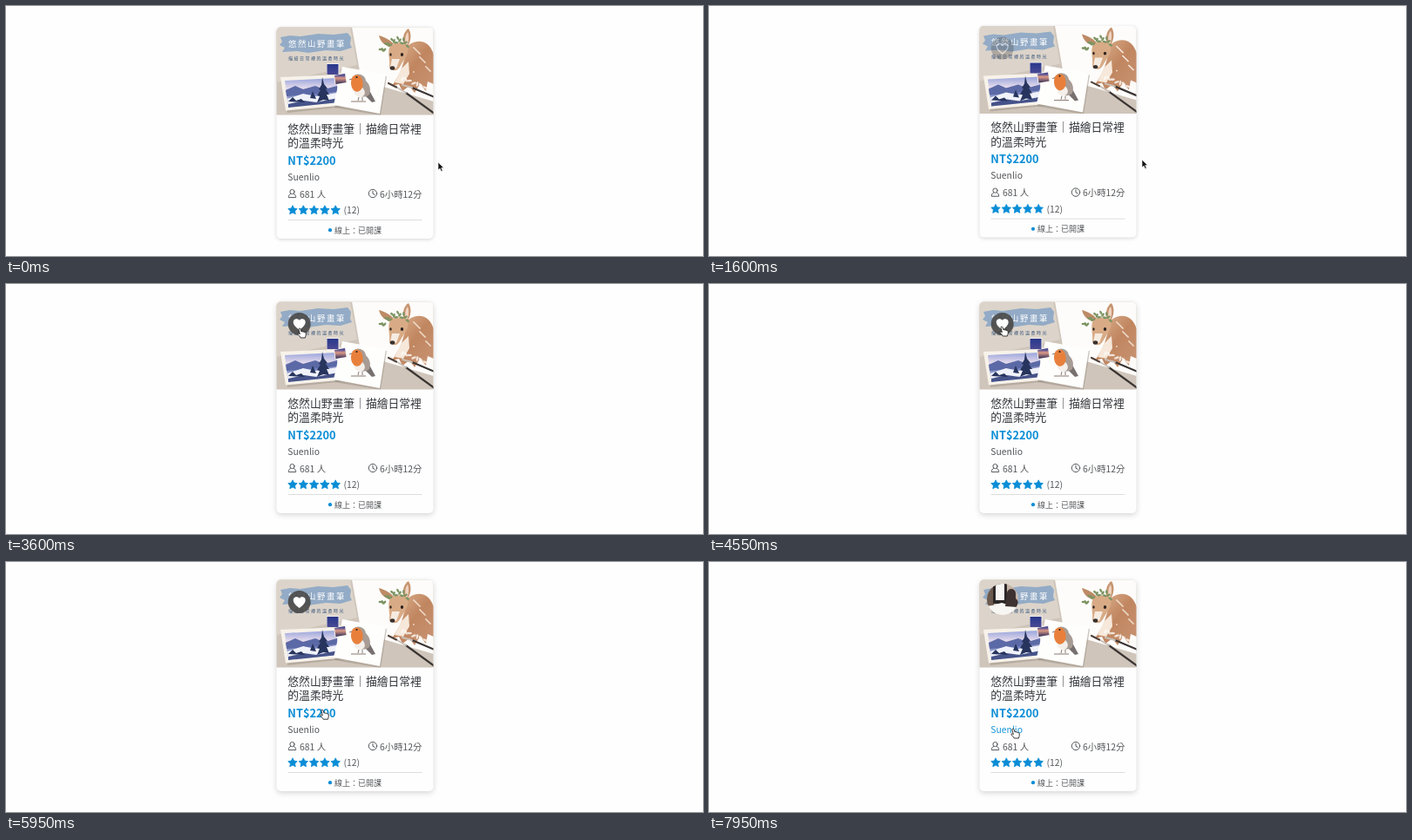
Recreate the animation shown at these times as an HTML page. Size 800 px wide and 288 px high, loop 8000 ms.

```html
<!DOCTYPE html>
<html lang="zh-TW">
<head>
<meta charset="utf-8">
<title>Course card</title>
<style>
  html, body { margin: 0; width: 100%; height: 100%; overflow: hidden; background: #fefefe; }
  svg { display: block; width: 800px; height: 288px; }
  text { font-family: "Noto Sans CJK TC", "Noto Sans CJK", "Noto Sans CJK JP", "Noto Sans", sans-serif; font-size: 10.4px; fill: #55575a; }
  .title { font-size: 12.8px; fill: #33363b; }
  .price { font-size: 12.8px; font-weight: 700; fill: #0a8dd6; }
  .icon { fill: none; stroke: #55575a; stroke-linecap: round; stroke-linejoin: round; }
</style>
</head>
<body>
<svg viewBox="0 0 800 288">
  <defs>
    <clipPath id="banner"><path d="M310.500 125.500V29.500a5 5 0 0 1 5-5h170a5 5 0 0 1 5 5v96z"/></clipPath>
    <clipPath id="round"><circle cx="337" cy="47" r="18"/></clipPath>
    <linearGradient id="sky" x2="0" y2="1">
      <stop stop-color="#98a5dc"/><stop offset=".35" stop-color="#e6dbec"/>
      <stop offset=".55" stop-color="#7180bd"/><stop offset="1" stop-color="#e9ecf7"/>
    </linearGradient>
    <linearGradient id="dusk" x2="0" y2="1">
      <stop stop-color="#28388c"/><stop offset=".55" stop-color="#4c4a94"/>
      <stop offset=".7" stop-color="#dd9a86"/><stop offset="1" stop-color="#2a2a58"/>
    </linearGradient>
    <linearGradient id="fur" x2="1" y2="1">
      <stop stop-color="#e0b794"/><stop offset=".5" stop-color="#c08660"/><stop offset="1" stop-color="#c99474"/>
    </linearGradient>
  </defs>

  <g id="card">
    <rect id="panel" x="310.500" y="24.500" width="180" height="243.500" rx="5" fill="#fefefe"/>
    <g clip-path="url(#banner)">
      <path fill="#cfc5ba" d="M310 24h181v102H310z"/>
      <path fill="#dcd4ca" d="M310 24h85l8 44-93 20z"/>
      <path fill="#fdfcfa" d="M397 24h94v86l-58-17-27-18z"/>

      <g id="deer">
        <path fill="url(#fur)" d="M462 45C475 36 487 42 491 56V90L484 87 482 98 475 90 469 100 463 92 455 98 451 90 443 92C449 83 453 76 455 69z"/>
        <path fill="#f6e8da" d="M454 72L462 64 463 78 456 90 446 88z"/>
        <g id="washes" fill="#fdfaf6" opacity=".8"></g>
        <g id="spots" fill="#f7eadb"></g>
        <path fill="#c69470" d="M457 46C454 37 457 29 462 26 466 32 465 41 460 48z"/>
        <path fill="#f0d3c0" d="M459 45C457 38 459 32 461 30 463 35 462 42 460 46z"/>
        <path fill="#bd8b66" d="M442 47C435 46 430 42 428 34 435 36 441 39 445 44z"/>
        <path fill="#d8ab86" d="M440 48C444 41 456 40 461 47 463 55 457 61 452 70 449 76 442 75 440 70 441 62 438 56 440 48z"/>
        <path fill="#f6ebe1" d="M443 61L452 61 448 72 441 71z"/>
        <ellipse cx="443.500" cy="71.500" rx="2.800" ry="2.200" fill="#3a302d"/>
        <ellipse cx="441.500" cy="56" rx="1.200" ry="1.800" fill="#2d2421"/>
        <ellipse cx="454.500" cy="56" rx="1.700" ry="1.900" fill="#2d2421"/>
        <g id="leaves" fill="#7d9463"></g>
      </g>

      <path fill="#93abc6" d="M315 36l11-2 12 1 20-3 18 1 16-2 4 5-1 8 2 4-13 4-17-1-20 3-13-2-17 1 3-5-6-3 3-4z"/>
      <text x="324" y="46.700" style="font-size:9.400px;letter-spacing:1.600px;font-weight:500;fill:#fff">悠然山野畫筆</text>
      <text x="324" y="61.800" style="font-size:5px;letter-spacing:1.500px;font-weight:500;fill:#38557c">描繪日常裡的溫柔時光</text>

      <path fill="#9d9185" opacity=".5" d="M317 84l68-4 4 36-66 7z"/>
      <path fill="#f7f2ea" d="M315 82l68-3 3 35.500-65 6z"/>
      <path fill="url(#sky)" d="M320 86l59-3 3 28-58 6z"/>
      <path fill="#5b69a6" d="M321 97l11-5 9 4 14-4 10 4 15-4 1 7-59 5z"/>
      <path fill="#f0f2fa" d="M323 107l18-6 14 3 25-4 1 8-57 6z"/>
      <path fill="#46538a" d="M324 113l18-4 14 2 25-5 1 5-58 6z"/>
      <path fill="#27345d" d="M363 82l2 8 4 5-2 1 4 6-3 0 3 7-7-1-7 3 3-7-3-1 4-6-2-1 3-5zM324 110l5-5 4 4 6-2 4 4zM349 106l3-8 4 9z"/>

      <path fill="#978b80" opacity=".5" d="M388 74l49 7-7 45-53-9z"/>
      <path fill="#fefefd" d="M386 70l50 9-7 45-53-10z"/>
      <path fill="#f3efe8" d="M368 66h14.500v13.500H368zM376 78.500l13.500-2 2 12-14 2z"/>
      <path fill="url(#dusk)" d="M368.500 67h13v12h-13zM377 80l12-2 1.500 10-12 2z"/>

      <g id="bird">
        <path fill="#76706f" d="M410 90l8 9 6 11-4 1-9-9z"/>
        <path fill="#a89c94" d="M399 81c4-5 13-2 14 5 5 5 6 10 4 16-6 5-14 2-16-4z"/>
        <path fill="#e8803c" d="M397 83c3-5 9-4 11 0 3 6 2 13-3 16-7 1-11-8-8-16z"/>
        <path fill="#f4efea" d="M399 98c5 2 8 0 10-4 5 5 3 10-2 11-4 0-7-3-8-7z"/>
        <circle cx="402.500" cy="82" r="1.100" fill="#222"/>
        <path fill="none" stroke="#6b564b" stroke-width=".800" d="M397 84l-3 1M405 105l-1 4M409 105l0 4M396 110l17 0"/>
      </g>

      <g fill="none" stroke-linecap="round">
        <path stroke="#3a3533" stroke-width="2.200" d="M459 100L492 124M466 94L492 105"/>
        <path stroke="#c9c0b8" stroke-width="2" d="M449 94L459 100M455 91L466 94"/>
        <path stroke="#514139" stroke-width="2.200" d="M439 89L448 93.500"/>
      </g>
    </g>

    <g id="like">
      <circle cx="336.700" cy="50" r="13" fill="#4a4a4a" fill-opacity=".92"/>
      <path id="heart" stroke="#fff" stroke-width="1.200" stroke-linejoin="round" d="M336.700 56.300C332.700 53.300 330.300 51 330.300 48.300C330.300 44.400 335 43.700 336.700 46.800C338.400 43.700 343.100 44.400 343.100 48.300C343.100 51 340.700 53.300 336.700 56.300z"/>
    </g>
    <g id="avatar" clip-path="url(#round)">
      <path fill="#c3b3a4" d="M318 28h38v38h-38z"/>
      <path fill="#6d5a4e" d="M318 28h9v26h-9z"/>
      <path fill="#2b2727" d="M326 28h16v24h-16z"/>
      <path fill="#f8f6f3" d="M329 28h10v20h-10zM318 56l18-5 20 6v9h-38z"/>
      <path fill="#3d3230" d="M342 40a5 5 0 0 1 10 0v6q4 3 4 10l-16-1z"/>
    </g>

    <text class="title" x="323.300" y="145.500">悠然山野畫筆｜描繪日常裡</text>
    <text class="title" x="323.300" y="162.200">的溫柔時光</text>
    <text class="price" x="323.300" y="182.700">NT$2200</text>
    <text id="author" x="323.300" y="200.800">Suenlio</text>
    <g class="icon">
      <circle cx="328.500" cy="214" r="2.600"/>
      <path d="M326.500 216.500C324.800 217.300 324.300 218.800 324.300 220.600H332.700C332.700 218.800 332.200 217.300 330.500 216.500"/>
      <circle cx="421" cy="216" r="4.700"/>
      <path d="M421 213.200v3l2.200 1.200"/>
    </g>
    <text x="337" y="220.500">681 人</text>
    <text x="477.500" y="220.500" text-anchor="end">6小時12分</text>
    <g id="stars" fill="#0a8dd6" stroke="#0a8dd6" stroke-width=".800" stroke-linejoin="round"></g>
    <text x="387.500" y="239">(12)</text>
    <path stroke="#dedede" d="M323.500 246.500h154"/>
    <circle cx="372" cy="258.200" r="2.100" fill="#0a8dd6"/>
    <text x="377" y="261.600" style="font-size:9px">線上：已開課</text>
  </g>

  <g id="cursor" stroke-linejoin="round">
    <path id="arrow" fill="#111" stroke="#fff" stroke-width=".600" d="M0 0V9L2.100 7.200 3.600 10.500 5.200 9.800 3.700 6.600H6.400z"/>
    <path id="hand" fill="#fff" stroke="#222" stroke-width=".900" d="M-2 1.200C-2.200-.1-.4-.5 0 .8L1 4C1.500 3.300 2.700 3.500 2.900 4.300 3.600 3.700 4.600 4 4.700 4.800 5.400 4.400 6.100 4.900 6.200 5.700L6.300 7.700C6.300 9.200 5.400 9.700 5.400 11H.2C0 9.700-2.600 8-3.100 6.800-3.200 5.700-2.100 5.600-.7 6.700z"/>
  </g>
</svg>
<script>
const LOOP = 8000;
const $ = id => document.getElementById(id);
const clamp = x => Math.min(1, Math.max(0, x));
const smooth = x => x * x * (3 - 2 * x);
const fade = (t, start, length = 200) => smooth(clamp((t - start) / length));
const repeat = (count, make) => Array.from({ length: count }, (_, i) => make(i)).join('');

// time, x, y of the pointer tip
const path = [
  [0, 496, 180], [80, 496, 180], [550, 458, 153], [800, 458, 151],
  [1150, 459, 151], [1600, 497, 177], [1800, 497, 177], [2200, 458, 149],
  [2600, 458, 149], [3200, 339, 51], [3600, 338, 51], [4550, 337, 49],
  [5150, 337, 50], [5850, 364, 170], [6200, 364, 171], [6650, 350, 192], [8000, 350, 192]
];

function pointerAt(t) {
  const i = path.findIndex(p => p[0] > t);
  const [t0, x0, y0] = path[i - 1], [t1, x1, y1] = path[i];
  const k = smooth((t - t0) / (t1 - t0));
  return [x0 + (x1 - x0) * k, y0 + (y1 - y0) * k];
}

function starPath(cx, cy, r) {
  const points = Array.from({ length: 10 }, (_, i) => {
    const a = i * Math.PI / 5 - Math.PI / 2, d = i % 2 ? r * 0.5 : r;
    return `${cx + d * Math.cos(a)} ${cy + d * Math.sin(a)}`;
  });
  return `<path d="M${points.join('L')}z"/>`;
}

function leaf(x, y, rx, ry, angle) {
  return `<ellipse cx="${x}" cy="${y}" rx="${rx}" ry="${ry}" transform="rotate(${angle} ${x} ${y})"/>`;
}

$('stars').innerHTML = repeat(5, i => starPath(329 + i * 12.3, 235.3, 5.5));
$('spots').innerHTML = repeat(22, i => leaf(468 + i * 7 % 20, 48 + i * 11 % 32, 1, .8, 0));
$('washes').innerHTML = repeat(9, i => leaf(455 + i * 13 % 35, 84 + i * 5 % 14, 3, 1.3, i * 40 - 60));
$('leaves').innerHTML = repeat(15, i =>
  leaf(430 + i * 2.2, 50 - 13 * Math.sin(i / 14 * 2.4) + i % 3 * 2.5, 2.5, 1.3, i * 67));

function draw(now) {
  const t = now % LOOP;
  const [x, y] = pointerAt(t);
  const hover = fade(t, 180) - fade(t, 1480) + fade(t, 1900);
  const profile = fade(t, 6600, 150);
  const inside = x < 491;

  $('card').setAttribute('transform', `translate(0 ${-4 * hover})`);
  $('panel').style.filter = `drop-shadow(0 ${1 + hover}px ${2 + hover}px rgba(0,0,0,.16))`;
  $('like').setAttribute('opacity', hover * (1 - profile));
  $('heart').setAttribute('fill', t >= 3400 ? '#fff' : 'none');
  $('avatar').setAttribute('opacity', profile);
  $('author').style.fill = profile > 0 ? '#1795d8' : '#55575a';
  $('cursor').setAttribute('transform', `translate(${x} ${y})`);
  $('arrow').setAttribute('visibility', inside ? 'hidden' : 'visible');
  $('hand').setAttribute('visibility', inside ? 'visible' : 'hidden');
  requestAnimationFrame(draw);
}
requestAnimationFrame(draw);
</script>
</body>
</html>
```
